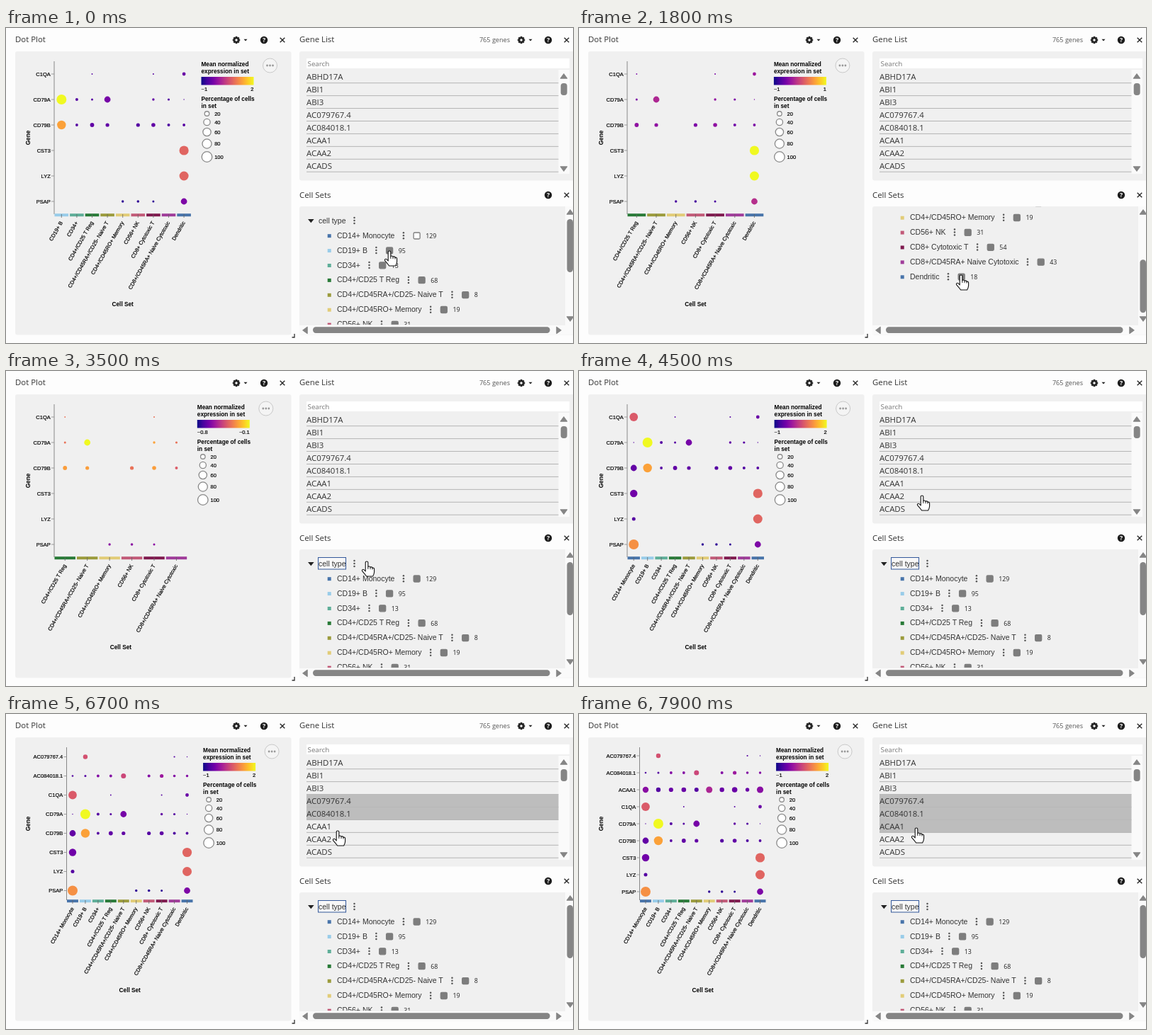
Write an HTML page that moves like this. It is 800 by 445 pixels and loops after 8 s.

```html
<!DOCTYPE html>
<html lang="en">
<head>
<meta charset="utf-8">
<title>Dot plot</title>
<style>
  html, body { margin: 0; width: 100%; height: 100%; overflow: hidden; background: #fdfdfd; }
  svg { display: block; width: 800px; height: 445px; }
  .ui { font: 11.4px "Open Sans", "Noto Sans", sans-serif; fill: #333; }
  .num { font: 8.8px "Open Sans", "Noto Sans", sans-serif; fill: #222; }
  .set { font: 10.5px "Liberation Sans", Arial, sans-serif; fill: #333; }
  .lab { font: 7.5px "Liberation Sans", Arial, sans-serif; fill: #000; stroke: #000; stroke-width: .2; }
  .head { font: bold 8.25px "Liberation Sans", Arial, sans-serif; fill: #000; }
</style>
</head>
<body>
<svg id="stage" viewBox="0 0 800 445" xmlns="http://www.w3.org/2000/svg">
  <defs>
    <clipPath id="geneClip"><rect x="414" y="58" width="366" height="148"/></clipPath>
    <clipPath id="setClip"><rect x="414" y="252" width="374" height="167"/></clipPath>
    <linearGradient id="ramp"></linearGradient>
  </defs>
  <g id="base"></g>
  <g id="live"></g>
</svg>
<script>
const LOOP = 8000, STEP = 100;
const $ = id => document.getElementById(id);

// ---- data ----
const SETS = [
  ['CD14+ Monocyte', 129, '#4874aa'], ['CD19+ B', 95, '#98cce9'],
  ['CD34+', 13, '#5eae98'], ['CD4+/CD25 T Reg', 68, '#287a37'],
  ['CD4+/CD45RA+/CD25- Naive T', 8, '#9b9b3c'], ['CD4+/CD45RO+ Memory', 19, '#e2cc77'],
  ['CD56+ NK', 31, '#c25a78'], ['CD8+ Cytotoxic T', 54, '#7f194e'],
  ['CD8+/CD45RA+ Naive Cytotoxic', 43, '#a03c9a'], ['Dendritic', 18, '#4874aa']
];
const GENES = ['ABHD17A', 'ABI1', 'ABI3', 'AC079767.4', 'AC084018.1', 'ACAA1', 'ACAA2', 'ACADS', 'ACAP1'];

// each dot: cell set, radius, mean expression (FAINT when left out)
const FAINT = -.35;
const DOTS = {
  'AC079767.4': [[1, 3.2, .8], [8, 1.1], [9, .7]],
  'AC084018.1': [[0, 1.3], [1, 1.5], [2, 1.9, 0], [3, 1.9, 0], [4, 3.5, .7], [6, 2, 0], [7, 2.6, .2], [8, 1.8, 0], [9, 1.7, 0]],
  ACAA1: [[0, 4.2, .05], [1, 3.2], [2, 3.1, -.2], [3, 3.3, -.2], [4, 3], [5, 4.5, .35], [6, 3.2, -.2], [7, 3.8, -.2], [8, 2.7, -.2], [9, 4.6, .05]],
  C1QA: [[0, 5.9, .9], [3, .9], [7, 1], [9, 2.4, -.2]],
  CD79A: [[0, .7], [1, 7, 2.2], [2, 2], [3, 1.5], [4, 4.4, -.1], [7, 1.7, -.25], [8, 1.6], [9, .7]],
  CD79B: [[0, 4.4, -.25], [1, 6.2, 1.55], [2, 1.9], [3, 2.9, -.26], [4, 2.6, -.26], [6, 2.6], [7, 2.8, -.26], [8, 2, -.4], [9, 1.9]],
  CST3: [[0, 5.2, -.15], [9, 6.6, 1]],
  LYZ: [[0, 2.5], [9, 6.5, 1]],
  PSAP: [[0, 7, 1.4], [5, 1.7, -.6], [6, 1.8, -.6], [7, 1.5, -.6], [9, 4.4, -.05]]
};
const PLASMA = ['#0d0887', '#46039f', '#7201a8', '#9c179e', '#bd3786', '#d8576b', '#ed7953', '#fb9f3a', '#fdca26', '#f0f921'];
const FIRST_GENES = Object.keys(DOTS).slice(3);

// ---- timeline ----
const WIDE = { max: 2.2, lo: '−1', hi: '2' }, MID = { max: 1, lo: '−1', hi: '1' }, LOW = { max: -.1, lo: '−0.8', hi: '−0.1' };
const PLOTS = [
  { at: 0, off: [0], width: 194.4, scale: WIDE },
  { at: 400, off: [0, 1], width: 194, scale: MID },
  { at: 900, off: [0, 1, 2], width: 193.8, scale: MID },
  { at: 2200, off: [0, 1, 2, 9], width: 188.7, scale: LOW },
  { at: 3600, off: [], width: 194.5, scale: WIDE },
  { at: 6500, off: [], left: 85, width: 179.5, scale: WIDE, added: 2 },
  { at: 7400, off: [], left: 85, width: 179.5, scale: WIDE, added: 3 }
];
const LOADING = [5000, 6500], ALL_ON = 3400;
const UNCHECK = { 0: 0, 1: 200, 2: 600, 9: 2000 };
const PICKED = { 3: 4900, 4: 6000, 5: 7000 };
const SCROLL = [[0, 0], [1000, 0], [1100, 16], [1500, 130], [2300, 130], [2600, 44], [2900, 0]];
const POINTER = [
  [0, 541, 315], [200, 541, 315], [500, 531, 331], [700, 531, 331], [1000, 553, 336], [1100, 554, 336],
  [1700, 539, 349], [2100, 539, 349], [2500, 557, 347], [2700, 557, 347], [3200, 509, 269], [3500, 509, 269],
  [4500, 484, 176], [4800, 468, 121], [5300, 468, 121], [5700, 468, 141], [6100, 468, 139],
  [6700, 468, 165], [7000, 473, 157], [7900, 476, 161]
];

// value of column c of a keyframe table at time t
function track(keys, t, c = 1) {
  const i = keys.findIndex(k => k[0] > t);
  if (i < 0) return keys[keys.length - 1][c];
  const a = keys[i - 1], b = keys[i], p = (t - a[0]) / (b[0] - a[0]);
  return a[c] + (b[c] - a[c]) * p;
}

// ---- drawing helpers ----
const rect = (x, y, w, h, fill, more = '') => `<rect x="${x}" y="${y}" width="${w}" height="${h}" fill="${fill}" ${more}/>`;
const circle = (x, y, r, fill, more = '') => `<circle cx="${x}" cy="${y}" r="${r}" fill="${fill}" ${more}/>`;
const line = (x1, y1, x2, y2, col, w = 1) => `<path d="M${x1} ${y1}L${x2} ${y2}" stroke="${col}" stroke-width="${w}"/>`;
const shape = (d, fill, more = '') => `<path d="${d}" fill="${fill}" ${more}/>`;
const text = (x, y, s, cls, more = '') => `<text x="${x}" y="${y}" class="${cls}" ${more}>${s}</text>`;
const at = (x, y, body) => `<g transform="translate(${x} ${y})">${body}</g>`;
const END = 'text-anchor="end"', MIDDLE = 'text-anchor="middle"';

function plasma(p) {
  const q = Math.max(0, Math.min(1, p)) * (PLASMA.length - 1);
  const i = Math.min(Math.floor(q), PLASMA.length - 2);
  const part = (hex, n) => parseInt(hex.substr(1 + 2 * n, 2), 16);
  const mix = n => Math.round(part(PLASMA[i], n) + (part(PLASMA[i + 1], n) - part(PLASMA[i], n)) * (q - i));
  return `rgb(${mix(0)},${mix(1)},${mix(2)})`;
}

const ruler = document.createElement('canvas').getContext('2d');
ruler.font = '10.5px "Liberation Sans", Arial, sans-serif';
const kebabX = name => 467 + ruler.measureText(name).width + 12.5;
const kebab = (x, y) => [-4, 0, 4].map(d => circle(x, y + d, 1.25, '#555')).join('');

function gear(x, y) {
  let s = '';
  for (let a = 0; a < 180; a += 45) s += rect(-1.3, -5.2, 2.6, 10.4, '#222', `transform="rotate(${a})"`);
  const caret = shape('M10.5 -1.2h5l-2.5 2.8z', '#222');
  return at(x, y, s + circle(0, 0, 3.9, '#222') + circle(0, 0, 1.7, '#fdfdfd') + caret);
}
const help = (x, y) => circle(x, y, 5.2, '#1c1c1c') +
  text(x, y + 3, '?', 'num', `${MIDDLE} style="fill:#fff;font-weight:700"`);
const cross = (x, y) => shape(`M${x - 3.3} ${y - 3.3}l6.6 6.6m0 -6.6l-6.6 6.6`, 'none', 'stroke="#222" stroke-width="1.3"');
const arrow = (x, y, turn) => shape('M-4.8 3.2h9.6l-4.8 -6.6z', '#858585', `transform="translate(${x} ${y}) rotate(${turn})" stroke="#858585" stroke-linejoin="round"`);

// ---- fixed parts ----
function drawBase() {
  const panel = '#f0f0f0', strip = '#fafafa', thumb = '#858585';
  return rect(13, 33, 389.5, 400.5, panel, 'rx="3"') +
    rect(414, 33, 392, 182.5, panel, 'rx="3"') +
    rect(414, 252, 392, 181.5, panel, 'rx="3"') +
    text(13, 20, 'Dot Plot', 'ui') + gear(325, 17) + help(364, 17) + cross(390, 17) +
    text(414, 20, 'Gene List', 'ui') + gear(727, 17) + help(765, 17) + cross(791, 17) +
    text(711, 20, '765 genes', 'ui', `${END} style="font-size:9.1px;fill:#555"`) +
    text(414, 239.5, 'Cell Sets', 'ui') + help(765, 236) + cross(791, 236) +
    rect(424, 43, 371, 14, '#fff') + text(425.5, 53.5, 'Search', 'ui', 'style="font-size:9.8px;fill:#777"') +
    rect(779.5, 59, 15.5, 147, strip) + arrow(787, 68, 0) + arrow(787, 199, 180) +
    rect(782.7, 78, 9, 17, thumb, 'rx="4"') +
    rect(789, 252, 11, 181, strip) + arrow(796, 260, 0) + arrow(796, 411, 180) +
    rect(414, 420, 375, 13.5, strip) + arrow(422, 427, -90) + arrow(780, 427, 90) +
    rect(433, 422.3, 334.5, 8.6, thumb, 'rx="4.2"') +
    shape('M403.5 437h3.5v-5', 'none', 'stroke="#333" stroke-width="1.3"');
}

// ---- dot plot ----
function drawLegend(x, scale) {
  let s = text(x, 53.5, 'Mean normalized', 'head') + text(x, 63.5, 'expression in set', 'head') +
    rect(x, 69, 74, 11.5, 'url(#ramp)') +
    text(x, 88.5, scale.lo, 'lab') + text(x + 74, 88.5, scale.hi, 'lab', END) +
    text(x, 102.5, 'Percentage of cells', 'head') + text(x, 112.5, 'in set', 'head');
  [121, 133, 147, 163.5, 182].forEach((y, i) => {
    const pct = 20 * (i + 1);
    s += circle(x + 8, y, 7.3 * Math.sqrt(pct / 100), '#fff', 'stroke="#8a8a8a" stroke-width="1.3"') +
      text(x + 18.7, y + 2.7, pct, 'lab');
  });
  s += circle(x + 97, 53, 10, '#f4f4f4', 'stroke="#c9c9c9"');
  for (const d of [-4, 0, 4]) s += circle(x + 97 + d, 53, 1.4, '#999');
  return s;
}

function drawPlot({ off, left = 67.5, width, scale, added = 0 }) {
  const genes = Object.keys(DOTS).slice(0, added).concat(FIRST_GENES);
  const cols = SETS.map((_, i) => i).filter(i => !off.includes(i));
  const dx = width / cols.length, dy = 216 / genes.length, top = 47;
  const colX = i => left + dx * (cols.indexOf(i) + .5);
  let s = line(left + .5, top, left + .5, 263, '#888');
  cols.forEach(i => {
    const x = colX(i);
    s += rect(x - dx / 2 + 1, 262.2, dx - 2, 4, SETS[i][2]) + line(x, 263, x, 268, '#666', .8) +
      text(0, 0, SETS[i][0], 'lab', `${END} transform="translate(${x + 2} 275) rotate(-60)"`);
  });
  genes.forEach((gene, row) => {
    const y = top + dy * (row + .5);
    s += line(left - 3.5, y, left + .5, y, '#888', .8) + text(left - 4.7, y + 2.6, gene, 'lab', END);
    for (const [i, r, v = FAINT] of DOTS[gene])
      if (cols.includes(i)) s += circle(colX(i), y, r, plasma((v + .8) / (scale.max + .8)));
  });
  return s + text(left + width / 2, 393.3, 'Cell Set', 'head', MIDDLE) +
    text(0, 0, 'Gene', 'head', `${MIDDLE} transform="translate(34 155) rotate(-90)"`) +
    drawLegend(left + width + 13.6, scale);
}

function drawLoading(t) {
  const turn = (t - 5700) * .36;
  return rect(13, 33, 389.5, 400.5, '#767577', 'rx="3"') +
    text(22.5, 55.7, 'Select at least one gene.', 'ui', 'style="fill:#111;font-size:11.5px"') +
    shape('M-14 0A14 14 0 0 0 -1 14', 'none', `stroke="#bcbcbc" stroke-width="2" transform="translate(208 234) rotate(${turn})"`);
}

// ---- lists ----
function drawGenes(t) {
  let s = '';
  GENES.forEach((name, i) => {
    const y = 69 + 17.93 * i;
    if (t >= PICKED[i]) s += rect(424, y - 9.2, 355.5, 18, '#bdbdbd');
    s += line(424, y + 8.7, 779.5, y + 8.7, '#b4b4b4') + text(424, y + 4.2, name, 'ui');
  });
  return `<g clip-path="url(#geneClip)">${s}</g>`;
}

function drawSets(t) {
  const scroll = track(SCROLL, t);
  let s = shape('M426 270h8.6l-4.3 5.2z', '#222');
  if (t >= ALL_ON) s += rect(440.5, 263.5, 39, 16.5, '#f8f8f8', 'stroke="#33589a"');
  s += text(441, 275.5, 'cell type', 'set') + kebab(491.5, 272);
  SETS.forEach(([name, count, color], i) => {
    const y = 293.2 + 20.9 * i, x = kebabX(name);
    const on = t >= ALL_ON || !(t >= UNCHECK[i]);
    s += rect(453.7, y - 2, 5, 5, color) + text(467, y + 3.5, name, 'set') + kebab(x, y) +
      rect(x + 14.2, y - 4.2, 9, 9, on ? '#7d7d7d' : '#fff', 'rx="1.5" stroke="#7d7d7d" stroke-width="1.3"') +
      text(x + 31.3, y + 3.6, count, 'num');
  });
  return `<g clip-path="url(#setClip)">${at(0, -scroll, s)}</g>` +
    rect(791.5, 270 + scroll * .44, 8.5, 75, '#858585', 'rx="4.2"');
}

const HAND = 'M-1.8 1.6Q-1.8 0 0 0T1.8 1.6V8Q2 6.8 3.5 7T5 8.6Q5.4 7.5 6.7 7.9T8 9.6Q8.6 8.8 9.7 9.3T10.6 11V15Q10.4 18 8.6 21H-.4Q-2.6 17.8 -5.6 14.6Q-7.4 12.6 -6 11.6T-3 12.6L-1.8 14Z';
const drawPointer = t => at(track(POINTER, t), track(POINTER, t, 2),
  shape(HAND, '#fff', 'stroke="#111" stroke-width="1.1" stroke-linejoin="round"') +
  shape('M1.8 8v3M5 8.6v2.6M8 9.6v2', 'none', 'stroke="#111" stroke-width=".9"'));

// ---- playback ----
function draw(t) {
  const loading = t >= LOADING[0] && t < LOADING[1];
  const plot = PLOTS.filter(p => p.at <= t).pop();
  $('live').innerHTML = (loading ? drawLoading(t) : drawPlot(plot)) + drawGenes(t) + drawSets(t) + drawPointer(t);
}

$('ramp').innerHTML = PLASMA.map((c, i) => `<stop offset="${i / (PLASMA.length - 1)}" stop-color="${c}"/>`).join('');
$('base').innerHTML = drawBase();

const start = performance.now();
let shown = -1;
function tick() {
  const t = Math.floor((performance.now() - start) % LOOP / STEP) * STEP;
  if (t !== shown) draw(shown = t);
  requestAnimationFrame(tick);
}
tick();
</script>
</body>
</html>
```
